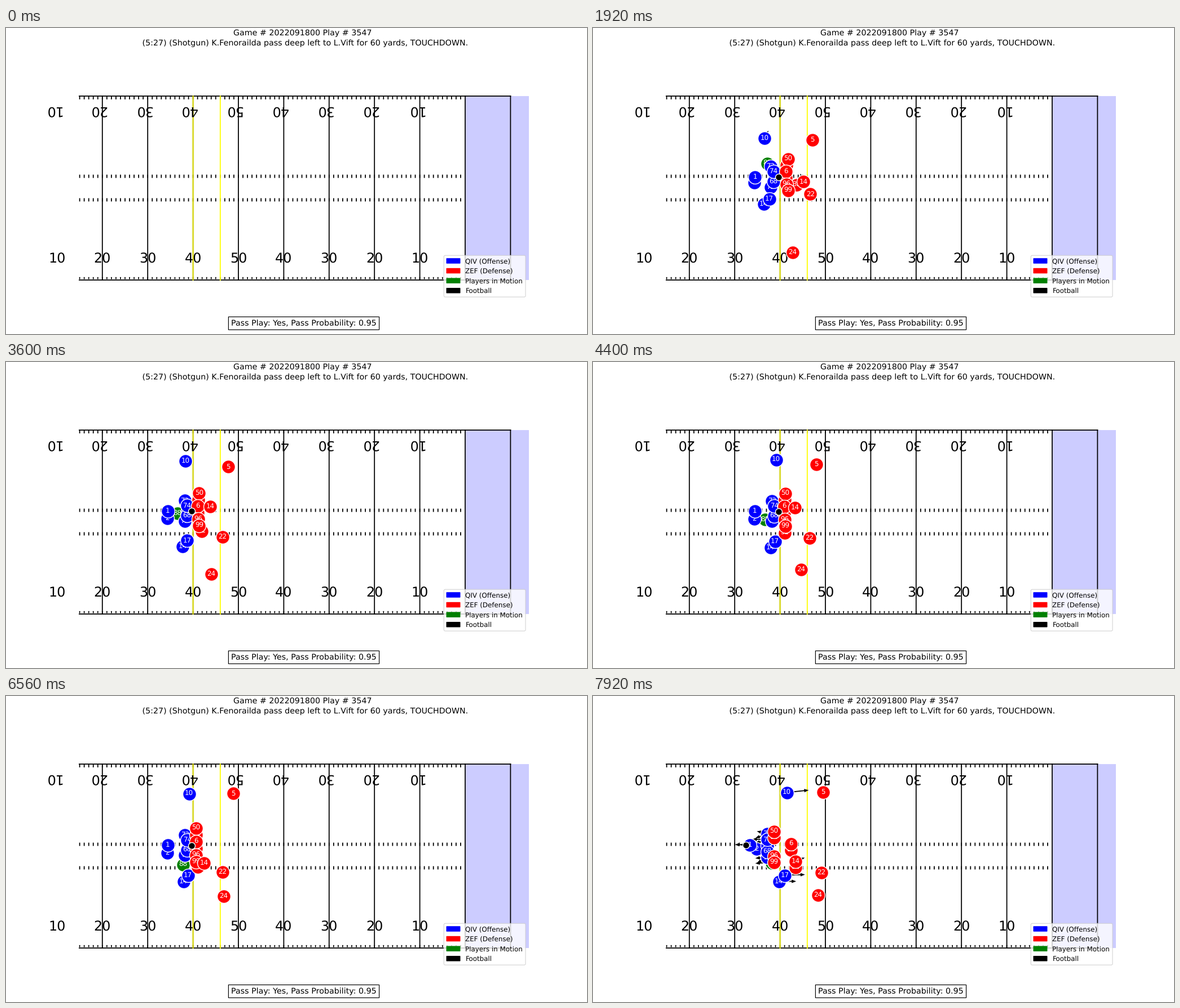
Write a matplotlib script that moves like this. It is 1030 by 544 pixels and loops after 8000 ms.

```python
import matplotlib.pyplot as plt
import numpy as np
from matplotlib.animation import FuncAnimation
from matplotlib.patches import Patch, Rectangle

W, H = 1030, 544
DPI = W / 12
FRAMES, INTERVAL = 100, 80
BREAK, LINED_UP, SET, SNAP, END = 10, 55, 82, 88, 99  # play timing, in frames

plt.rcParams.update({"font.family": "DejaVu Sans", "text.hinting": "none",
                     "path.snap": False})
fig = plt.figure(figsize=(W / DPI, H / DPI), dpi=DPI, facecolor="white")


def draw_field(ax):
    ax.set(xlim=(24.77, 124.055), ylim=(-5.89, 62.39))
    ax.axis("off")
    ax.add_patch(Rectangle((110, 0), 120, 53.3, fc="blue", alpha=0.2, lw=0))

    for x in range(30, 130, 10):
        ax.plot([x, x], [0, 53.3], color="black")
    for y in (0, 53.3):
        ax.plot([10, 120], [y, y], color="black")

    marks = np.arange(25, 110)
    for low, high in ((0.4, 0.7), (52.5, 53), (22.91, 23.57), (29.73, 30.39)):
        ax.vlines(marks, low, high, color="black", lw=1.5,
                  capstyle="projecting")

    for x in range(20, 110, 10):
        label = str(50 - abs(60 - x))
        ax.text(x, 5, label, ha="center", fontsize=20)
        ax.text(x - 0.95, 48.3, label, ha="center", fontsize=20, rotation=180)

    for x in (50, 56):
        ax.plot([x, x], [0, 53.3], color="yellow")

    key = {"QIV (Offense)": "blue", "ZEF (Defense)": "red",
           "Players in Motion": "green", "Football": "black"}
    ax.legend(handles=[Patch(color=c, label=t) for t, c in key.items()],
              loc="lower right")


draw_field(fig.add_axes([0.125, 0.11, 0.775, 0.77]))

# Overlay measured in pixels, y pointing down
stage = fig.add_axes([0, 0, 1, 1])
stage.set(xlim=(0.5, W + 0.5), ylim=(H + 0.5, 0.5))
stage.axis("off")
stage.text(528.5, 31.5, "Game # 2022091800 Play # 3547 \n (5:27) (Shotgun) "
           "K.Fenorailda pass deep left to L.Vift for 60 yards, TOUCHDOWN.",
           ha="center", fontsize=12, linespacing=1.37)
stage.text(528.5, 525.5, "Pass Play: Yes, Pass Probability: 0.95",
           ha="center", va="center", fontsize=12,
           bbox=dict(fc="white", ec="black"))


class Runner:
    """Walks a quadratic curve to its stance, then bursts at the snap.

    Points are complex numbers. With no via point the walk eases out;
    brake runs from a full sprint (-0.5) to a stop (1) at the end.
    """

    def __init__(self, number, color, start, stance, goal=None, via=None,
                 leave=BREAK, arrive=LINED_UP, brake=-0.5):
        self.start, self.stance = start, stance
        self.goal = stance if goal is None else goal
        self.via = stance if via is None else via
        self.leave, self.arrive, self.brake = leave, arrive, brake

        z = 10 + len(runners)
        self.dot, = stage.plot([], [], "o", ms=20 if number else 10, mfc=color,
                               mec="white", mew=1.2, zorder=z)
        self.label = stage.text(0, 0, number, color="white", fontsize=10,
                                ha="center", va="center", zorder=z)
        runners.append(self)

    def at(self, f):
        u = min((f - self.leave) / (self.arrive - self.leave), 1)
        if u < 0:
            u = max(u / 2, -0.06)
        walk = ((1 - u) ** 2 * self.start + 2 * u * (1 - u) * self.via
                + u * u * self.stance)
        v = max((f - SNAP) / (END - SNAP), 0)
        burst = v * v * (3 - 2 * self.brake * v) / (3 - 2 * self.brake)
        return walk + (self.goal - self.stance) * burst

    def move(self, spot, shown):
        self.dot.set_data([spot.real], [spot.imag])
        self.label.set_position((spot.real, spot.imag))
        self.dot.set_visible(shown)
        self.label.set_visible(shown)


runners = []

# Offense: backs and receivers around a bowed line of five blockers
Runner("88", "green", 309 + 241j, 314.5 + 300j, 317 + 297j, via=298 + 287j,
       leave=24, arrive=SET)
Runner("10", "blue", 294 + 220j, 325 + 174j, 344 + 172j, via=311 + 176j)
Runner("2", "blue", 286 + 271j, 286 + 279j, 290 + 272j)
Runner("14", "blue", 290 + 295j, 315 + 330j, 330 + 330j)
for number, i in (("72", 0), ("58", 2), ("75", 4), ("68", 3), ("74", 1)):
    bow = (i - 2) ** 2
    Runner(number, "blue", 321 - 2.2 * bow + (245 + 9.5 * i) * 1j,
           323 - 1.3 * bow + (247 + 9 * i) * 1j,
           309 + (245 + 10.7 * i) * 1j)
Runner("1", "blue", 289 + 266j, 287 + 265j, 278.5 + 265j)
Runner("17", "blue", 302 + 288j, 323 + 319.5j, 340.5 + 319j)

# Defense: deep players around a front of six, the middle two drop back
Runner("24", "red", 348.5 + 418j, 399 + 354j, via=365 + 354j, arrive=END)
Runner("5", "red", 386.5 + 210j, 408 + 171.5j, via=396 + 174j, arrive=END)
Runner("32", "red", 370.5 + 251.5j, 340 + 304j, 359.5 + 305j, via=356 + 304j,
       brake=1)
for number, i in (("93", 1), ("50", 0), ("36", 3), ("6", 2), ("96", 4),
                  ("99", 5)):
    drops = i in (2, 3)
    start = 343.5 + 0.8 * (i - 2.5) ** 2 + (233 + 11 * i) * 1j
    stance = 337 + (235 + 12 * i) * 1j
    Runner(number, "red", start, stance,
           (351 if drops else 321) + (241 + 11 * i) * 1j,
           via=(start + stance) / 2, arrive=SET, brake=1 if drops else -0.5)
Runner("14", "red", 382.5 + 300.5j, 351.5 + 297j, 359.5 + 294j,
       via=358 + 216j, arrive=SET)
Runner("22", "red", 388 + 277j, 384 + 313j, 405.5 + 314.5j, brake=1)
Runner("", "black", 328.5 + 265.5j, 329.5 + 266j, 271.5 + 265j, brake=0.93)

zeros = np.zeros(len(runners))
arrows = stage.quiver(zeros, zeros, zeros, zeros, color="black", angles="xy",
                      scale_units="xy", scale=1, units="dots", width=1.8,
                      headwidth=3.4, headlength=4.4, headaxislength=4.4,
                      zorder=5)


def pose(f):
    return np.array([r.at(f) for r in runners])


def update(f):
    shown = f > 0
    spots = pose(f)
    speed = 100 * (pose(f + 0.05) - pose(f - 0.05))  # per ten frames
    arrows.set_offsets(np.column_stack([spots.real, spots.imag]))
    arrows.set_UVC(speed.real, speed.imag)
    arrows.set_visible(shown)
    for runner, spot in zip(runners, spots):
        runner.move(spot, shown)


anim = FuncAnimation(fig, update, frames=FRAMES, interval=INTERVAL,
                     repeat=True, repeat_delay=0)
plt.show()
```
